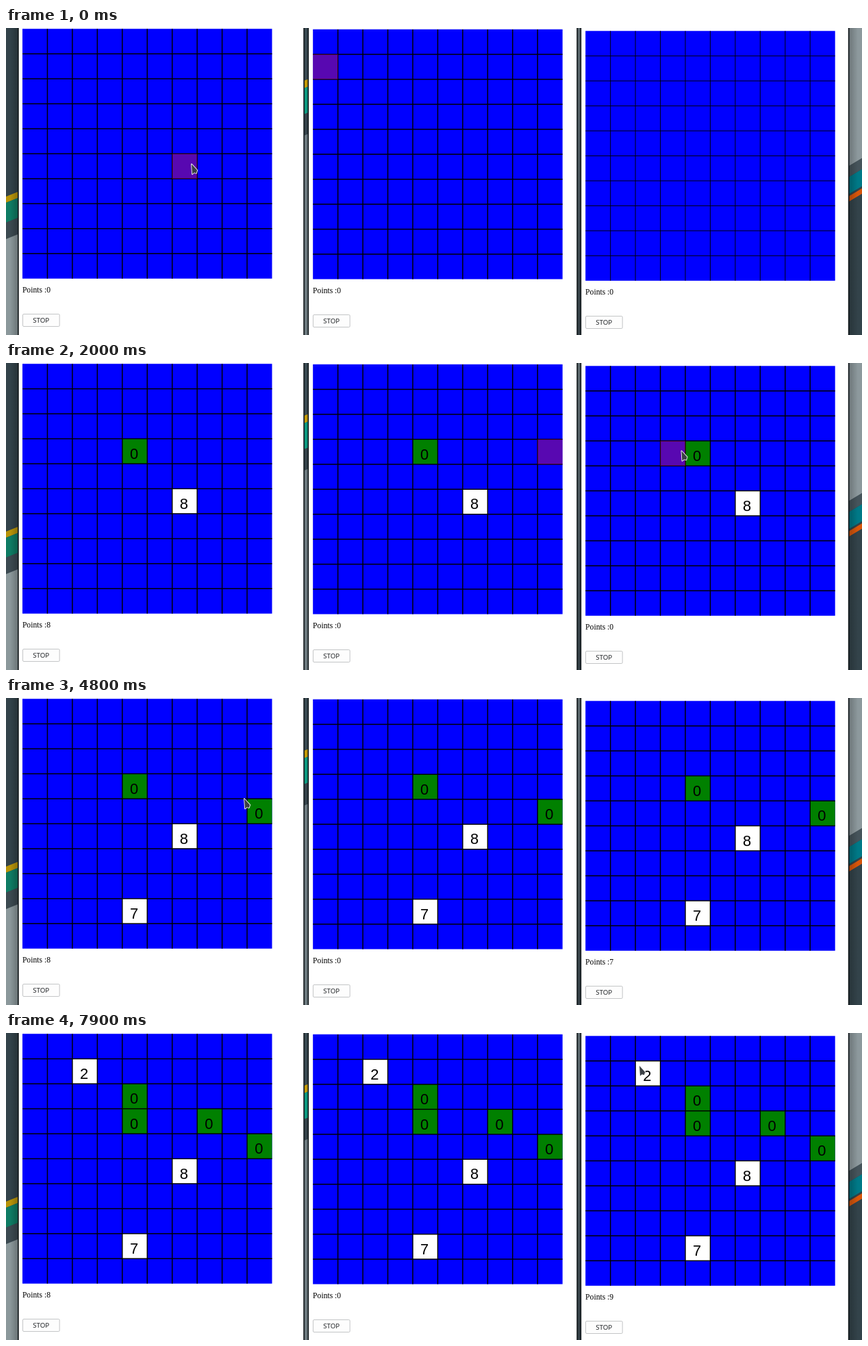
Recreate the animation shown at these times as an HTML page with a canvas. Size 1250 by 448 pixels, loop 8000 ms.

```html
<!DOCTYPE html>
<html lang="en">
<head>
<meta charset="utf-8">
<title>Three player boards</title>
<style>
  html, body { margin: 0; width: 100%; height: 100%; overflow: hidden; background: #33434a; }
  canvas { display: block; }
</style>
</head>
<body>
<canvas id="stage" width="1250" height="448"></canvas>
<script>
const ctx = document.getElementById('stage').getContext('2d');
const LOOP = 8000, STEP = 100, LAG = 20;
const CELL = 36.45, COUNT = 10, SIZE = CELL * COUNT;

const boards = [{ x: 24, y: 1.2 }, { x: 448.2, y: 2 }, { x: 846.2, y: 4.3 }];

// Cells uncovered by each player; the value is also the score gained
const reveals = [
  { time: 400, player: 0, col: 6, row: 5, value: 8 },
  { time: 1400, player: 1, col: 4, row: 3, value: 0 },
  { time: 3000, player: 2, col: 4, row: 8, value: 7 },
  { time: 4800, player: 0, col: 9, row: 4, value: 0 },
  { time: 6000, player: 1, col: 4, row: 2, value: 0 },
  { time: 7000, player: 1, col: 7, row: 3, value: 0 },
  { time: 7900, player: 2, col: 2, row: 1, value: 2 }
];

// Straight pointer moves: start time, end time, destination
const home = [271, 198.7];
const glides = [
  [500, 1300, 612, 128], [1300, 1400, 589, 72],
  [1500, 1600, 632, 121.5], [1600, 2100, 1075, 130], [2100, 2400, 1008, 310],
  [2900, 3300, 672, 282], [3400, 3500, 474, 205], [3500, 3900, 348, 147],
  [5100, 5400, 532, 116], [5500, 5800, 621, 95], [6200, 6300, 706, 103],
  [6400, 6800, 718.5, 114], [7100, 7680, 925, 48]
];

function pointerAt(t) {
  let [x, y] = home;
  for (const [from, to, tx, ty] of glides) {
    if (t <= from) break;
    const k = Math.min(1, (t - from) / (to - from));
    x += (tx - x) * k;
    y += (ty - y) * k;
  }
  return [x, y];
}

// Each board keeps the last cell the pointer entered; a reveal clears them all
function highlights(t, since) {
  const cells = since ? [] : [[6, 5], [0, 1]];
  for (let s = since + STEP; s <= t; s += STEP) {
    if (pointerAt(s)[0] === pointerAt(s - STEP)[0]) continue;
    const [px, py] = pointerAt(s - LAG);
    boards.forEach((b, i) => {
      const cell = [(px - b.x) / CELL, (py - b.y) / CELL].map(Math.floor);
      if (cell.every(n => n >= 0 && n < COUNT)) cells[i] = cell;
    });
  }
  return cells;
}

function rect(color, x, y, w, h) {
  ctx.fillStyle = color;
  ctx.fillRect(x, y, w, h);
}

function path(points) {
  ctx.beginPath();
  points.forEach(([x, y]) => ctx.lineTo(x, y));
  ctx.closePath();
}

function text(str, x, y, font, color, align = 'left') {
  ctx.font = font;
  ctx.fillStyle = color;
  ctx.textAlign = align;
  ctx.fillText(str, x, y);
}

// Slanted bands stacked downwards: colour and the y where each one ends
function bands(x, w, slope, list) {
  let top = -20;
  for (const [color, end] of list) {
    path([[x, top], [x + w, top - slope * w], [x + w, end - slope * w], [x, end]]);
    ctx.fillStyle = color;
    ctx.fill();
    top = end;
  }
}

function shade(x0, x1) {
  const g = ctx.createLinearGradient(x0, 0, x1, 0);
  g.addColorStop(0, 'rgba(0,0,0,0)');
  g.addColorStop(1, 'rgba(0,0,0,0.25)');
  rect(g, Math.min(x0, x1), 0, Math.abs(x1 - x0), 448);
}

function drawDesktop() {
  rect('#33434a', 0, 0, 1250, 448);
  bands(0, 18, 0.4, [['#33434a', 246], ['#b8940a', 255], ['#0f7c64', 284],
    ['#3c4a51', 308], ['#8b989b', 470]]);
  bands(435, 7, 0.4, [['#3a4a52', 77], ['#c49a08', 88], ['#0d9a80', 126],
    ['#35434a', 157], ['#6d7a7f', 470]]);
  bands(1230, 20, 0.6, [['#8d999d', 202], ['#46545b', 218], ['#007987', 243],
    ['#33434a', 246], ['#d9560b', 254], ['#33434a', 470]]);
  shade(6, 18);
  shade(1244, 1230);

  const gap = ctx.createLinearGradient(0, 0, 0, 448);
  gap.addColorStop(0, '#5d6a6f');
  gap.addColorStop(1, '#333f45');
  rect(gap, 834, 0, 7, 448);

  [[18, 417], [441.5, 392.5], [839.5, 391]].forEach(([x, w]) => {
    rect('#10171a', x - 1, 0, w + 2, 448);
    rect('#ffffff', x + 0.7, 0, w - 1.4, 448);
  });
}

function drawButton(x, y) {
  ctx.beginPath();
  ctx.roundRect(x + 0.5, y + 0.5, 53.7, 18, 1.5);
  ctx.fillStyle = '#fdfdfd';
  ctx.fill();
  ctx.strokeStyle = '#c4c6c7';
  ctx.lineWidth = 1;
  ctx.stroke();
  text('STOP', x + 27.2, y + 13, '9.75px "Noto Sans", "Open Sans", sans-serif', '#232629', 'center');
}

function drawBoard({ x, y }, shown, hover, score, faint) {
  rect('#0000ff', x, y, SIZE, SIZE);

  for (const { col, row, value } of shown) {
    const cx = x + col * CELL, cy = y + row * CELL;
    rect(value ? '#ffffff' : '#008000', cx, cy, CELL, CELL);
    text(value, cx + 17.2, cy + 29.2, '21.9px "Liberation Sans", Arial, sans-serif', '#000', 'center');
  }

  const w = faint ? 1.1 : 1.45;
  const color = faint ? 'rgba(0,0,0,0.85)' : '#000';
  for (let i = 1; i < COUNT; i++) {
    rect(color, x + i * CELL - w / 2, y, w, SIZE);
    rect(color, x, y + i * CELL - w / 2, SIZE, w);
  }

  if (hover) rect('rgba(220,20,60,0.4)', x + hover[0] * CELL, y + hover[1] * CELL, CELL, CELL);

  text('Points :' + score, x - 0.1, Math.round(y + 384.8),
    '11.65px "Liberation Serif", "Times New Roman", serif', '#000');
  drawButton(Math.round(x), Math.round(y + 415.6));
}

function drawPointer([x, y]) {
  path([[0, 0], [8.2, 8.9], [6.8, 13.2], [3.8, 12.2], [1, 14.5]].map(([dx, dy]) => [x + dx, y + dy]));
  ctx.lineJoin = 'round';
  ctx.lineWidth = 1.8;
  ctx.strokeStyle = '#f4f4f4';
  ctx.stroke();
  ctx.fillStyle = '#3b4045';
  ctx.fill();
}

function draw(time) {
  const t = Math.floor(time / STEP) * STEP;
  const shown = reveals.filter(r => r.time <= t);
  const since = shown.length ? shown[shown.length - 1].time : 0;
  const hover = highlights(t, since);

  drawDesktop();
  boards.forEach((b, i) => {
    const score = shown.reduce((sum, r) => sum + (r.player === i ? r.value : 0), 0);
    drawBoard(b, shown, hover[i], score, i === 2 && !shown.length);
  });
  drawPointer(pointerAt(t));
}

const start = performance.now();
function frame() {
  draw((performance.now() - start) % LOOP);
  requestAnimationFrame(frame);
}
frame();
</script>
</body>
</html>
```
